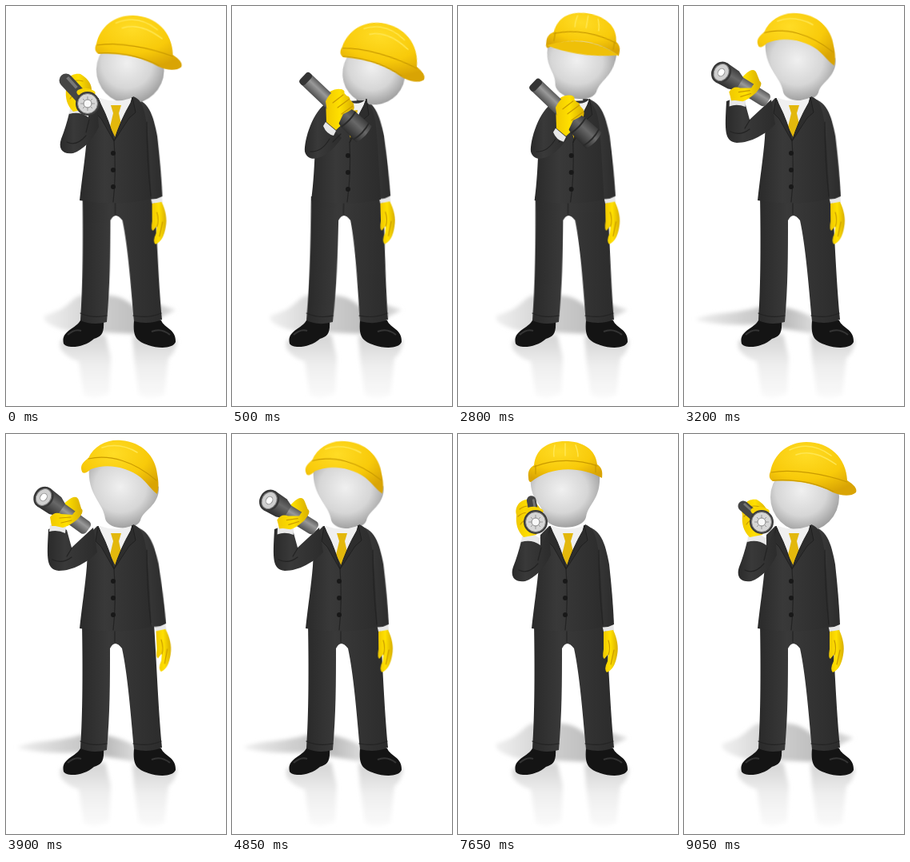
Recreate the animation shown at these times as an HTML page without scripts. Size 275x500 px, loop 9.65 s.

```html
<!DOCTYPE html>
<html lang="en">
<head>
<meta charset="utf-8">
<title>Inspector with a flashlight</title>
<style>
html, body { margin: 0; width: 100%; height: 100%; overflow: hidden; background: #fff }
svg { display: block; width: 275px; height: 500px }

/* Every move advances in 100 ms steps; three steps is the usual length. */
.move { animation: 9650ms steps(3, start) infinite }
.show { animation: 9650ms step-end infinite }

.show-hat-right { animation-name: show-hat-right }
.show-hat-front { animation-name: show-hat-front }
.show-left { animation-name: show-left }
.show-side { animation-name: show-side }
.show-fore { animation-name: show-fore }
.show-facing { animation-name: show-facing }
.show-wide { animation-name: show-wide }
.glare { animation-name: glare }

@keyframes show-hat-right { 0%, 91.7% { opacity: 1 } 27.97% { opacity: 0 } }
@keyframes show-hat-front { 0%, 31.08%, 91.7% { opacity: 0 } 27.97%, 57.51% { opacity: 1 } }
@keyframes show-left { 0%, 57.51% { opacity: 0 } 31.08% { opacity: 1 } }
@keyframes show-side { 0%, 31.08% { opacity: 0 } 2.07% { opacity: 1 } }
@keyframes show-facing { 0%, 31.08% { opacity: 1 } 2.07% { opacity: 0 } }
@keyframes show-fore { 0%, 57.51% { opacity: 1 } 2.07% { opacity: 0 } }
@keyframes show-wide { 0%, 57.51% { opacity: 1 } 31.08% { opacity: 0 } }
@keyframes glare { 0%, 78.2% { opacity: 0 } 55.44% { opacity: 1 } }

.hat-right { animation-name: hat-right; transform-origin: 160px 40px }
@keyframes hat-right {
  0% { translate: 0 0; rotate: 0deg; animation-timing-function: steps(6, start) }
  6.21%, 9.84% { translate: 30px 12px; rotate: 8deg }
  12.95%, 15.54% { translate: 30px 15px; rotate: 10deg }
  18.65%, 24.87% { translate: 30px 12px; rotate: 8deg; animation-timing-function: steps(9, start) }
  34.19% { translate: -36px -9px; rotate: -16deg }
  89.63% { translate: -24px 0; rotate: -10deg; animation-timing-function: steps(5, start) }
  94.81%, 100% { translate: 0 0; rotate: 0deg }
}
.face-right { animation-name: face-right; transform-origin: 150px 78px }
@keyframes face-right {
  0% { translate: 0 0; scale: 1; animation-timing-function: steps(6, start) }
  6.21%, 18.65%, 24.87% { translate: 1px -5px; scale: .91; animation-timing-function: steps(9, start) }
  34.19%, 100% { translate: 0 0; scale: 1 }
}
.hat-front { animation-name: hat-front; transform-origin: 134px 40px }
@keyframes hat-front {
  0%, 24.87% { translate: 44px 0; rotate: 18deg; animation-timing-function: steps(9, start) }
  34.19% { translate: 8px 0; rotate: 3deg }
  55.44% { translate: 8px 0; rotate: 3deg; animation-timing-function: steps(5, start) }
  60.62%, 69.94%, 80.31% { translate: 0 0; rotate: 0deg }
  73.05%, 77.2% { translate: 0 1px; rotate: 0deg }
  89.63% { translate: 0 0; rotate: 0deg; animation-timing-function: steps(5, start) }
  94.81%, 100% { translate: 24px 0; rotate: 9deg }
}
.hat-left { animation-name: hat-left; transform-origin: 145px 50px }
@keyframes hat-left {
  0%, 24.87% { translate: 36px 0; rotate: 4deg; animation-timing-function: steps(9, start) }
  34.19%, 38.34%, 51.29% { translate: -2px 1px; rotate: -2deg }
  41.45%, 48.18% { translate: 0 0; rotate: 0deg }
  55.44% { translate: -2px 1px; rotate: -2deg; animation-timing-function: steps(5, start) }
  60.62%, 100% { translate: -8px 2px; rotate: -10deg }
}
.legs { animation-name: legs; transform-origin: 144px 395px }
@keyframes legs {
  0% { transform: skewX(0); animation-timing-function: steps(6, start) }
  6.21%, 24.87% { transform: skewX(-1.4deg); animation-timing-function: steps(9, start) }
  34.19%, 100% { transform: skewX(0) }
}
.side-torso { animation-name: side-torso }
@keyframes side-torso {
  0%, 24.87% { translate: 0 0; animation-timing-function: steps(9, start) }
  34.19%, 100% { translate: -6px 0 }
}
.hanging-arm { animation-name: hanging-arm; transform-origin: 172px 125px }
@keyframes hanging-arm {
  0% { rotate: 0deg; animation-timing-function: steps(6, start) }
  6.21%, 24.87% { rotate: -1.6deg; animation-timing-function: steps(9, start) }
  34.19%, 38.34%, 51.29% { rotate: -.5deg }
  41.45%, 48.18% { rotate: -2.6deg }
  55.44% { rotate: -.5deg; animation-timing-function: steps(5, start) }
  60.62%, 100% { rotate: 0deg }
}
.side-light { animation-name: side-light }
@keyframes side-light {
  0% { translate: -30px -6px; animation-timing-function: steps(6, start) }
  6.21%, 9.84% { translate: 0 0 }
  12.95%, 15.54% { translate: -1px -2px }
  18.65%, 24.87% { translate: 0 0; animation-timing-function: steps(9, start) }
  34.19%, 100% { translate: 9px 14px }
}
.left-light { animation-name: left-light; transform-origin: 75px 100px }
@keyframes left-light {
  0%, 24.87% { translate: 110px 50px; rotate: 0deg; animation-timing-function: steps(9, start) }
  34.19%, 38.34%, 51.29% { translate: 1px 2px; rotate: -4deg }
  41.45%, 48.18% { translate: 0 0; rotate: 0deg }
  55.44% { translate: 1px 2px; rotate: -4deg; animation-timing-function: steps(5, start) }
  60.62%, 100% { translate: 26px 20px; rotate: 20deg }
}
.left-sleeve { animation-name: left-sleeve }
@keyframes left-sleeve {
  0%, 24.87% { translate: 60px 40px; animation-timing-function: steps(9, start) }
  34.19%, 55.44% { translate: 0 0; animation-timing-function: steps(5, start) }
  60.62%, 100% { translate: 20px 18px }
}
.lens { animation-name: lens }
@keyframes lens {
  0% { translate: 97px 110px; animation-timing-function: steps(6, start) }
  6.21% { translate: 127px 182px }
  55.44% { translate: 70px 88px; animation-timing-function: steps(5, start) }
  60.62%, 69.94% { translate: 90px 99px }
  73.05%, 77.2% { translate: 87px 103px }
  80.31%, 100% { translate: 97px 110px }
}
.barrel { animation-name: barrel }
@keyframes barrel {
  0% { rotate: 0deg; scale: 1; animation-timing-function: steps(6, start) }
  6.21% { rotate: 36deg; scale: 2.8 }
  55.44% { rotate: 0deg; scale: .7; animation-timing-function: steps(5, start) }
  60.62%, 69.94% { rotate: 38deg; scale: .3 }
  73.05%, 77.2% { rotate: 38deg; scale: .5 }
  80.31%, 89.63% { rotate: 38deg; scale: .9; animation-timing-function: steps(5, start) }
  94.81%, 100% { rotate: 0deg; scale: 1 }
}
.fore-hand { animation-name: fore-hand }
@keyframes fore-hand {
  0% { translate: 0 0; animation-timing-function: steps(6, start) }
  6.21% { translate: 12px 18px }
  55.44% { translate: -14px -6px; animation-timing-function: steps(5, start) }
  60.62%, 77.2% { translate: -2px 2px }
  80.31%, 100% { translate: 0 0 }
}

.crease { fill: none; stroke: #232323; stroke-width: 1.2; stroke-linecap: round }
.rim { fill: none; stroke: #c99a00; stroke-width: 1.2; stroke-linecap: round }
.shine { fill: none; stroke: #ffe650; stroke-width: 1.5; stroke-linecap: round }
</style>
</head>
<body>
<svg viewBox="0 0 275 500">
<defs>
  <radialGradient id="skin" cx=".45" cy=".4" r=".62">
    <stop offset="0" stop-color="#f0f0f0"/><stop offset=".6" stop-color="#d6d6d6"/><stop offset="1" stop-color="#9c9c9c"/>
  </radialGradient>
  <radialGradient id="helmet" cx=".42" cy=".25" r=".75">
    <stop offset="0" stop-color="#ffdc25"/><stop offset=".6" stop-color="#f8ca0a"/><stop offset="1" stop-color="#d9a404"/>
  </radialGradient>
  <linearGradient id="glove">
    <stop offset="0" stop-color="#f0c800"/><stop offset=".5" stop-color="#ffe000"/><stop offset="1" stop-color="#d8ae00"/>
  </linearGradient>
  <linearGradient id="suit">
    <stop offset="0" stop-color="#2a2a2a"/><stop offset=".35" stop-color="#393939"/><stop offset="1" stop-color="#2c2c2c"/>
  </linearGradient>
  <linearGradient id="metal" x2="0" y2="1">
    <stop offset="0" stop-color="#5c5c5c"/><stop offset=".4" stop-color="#999"/><stop offset="1" stop-color="#505050"/>
  </linearGradient>
  <linearGradient id="lamp-head" x2="0" y2="1">
    <stop offset="0" stop-color="#3a3a3a"/><stop offset=".4" stop-color="#686868"/><stop offset="1" stop-color="#2c2c2c"/>
  </linearGradient>
  <linearGradient id="mirror" x2="0" y2="1">
    <stop offset=".1" stop-color="#d8d8d8"/><stop offset=".5" stop-color="#efefef"/><stop offset="1" stop-color="#fafafa"/>
  </linearGradient>
  <linearGradient id="shade">
    <stop offset="0" stop-color="#f0f0f0"/><stop offset=".4" stop-color="#cfcfcf"/><stop offset=".75" stop-color="#bcbcbc"/><stop offset="1" stop-color="#dedede"/>
  </linearGradient>
  <filter id="soft" x="-20%" y="-40%" width="140%" height="180%"><feGaussianBlur stdDeviation="2.5"/></filter>
  <g id="buttons" fill="#181818"><circle r="3"/><circle cy="21" r="3"/><circle cy="42" r="3"/></g>
</defs>

<g fill="url(#mirror)" filter="url(#soft)">
  <path d="M68 418L124 410L131 440L129 484Q110 494 97 486L91 444Q76 440 68 428Z"/>
  <path d="M158 412L214 418Q212 434 203 440L198 486Q180 494 166 486L160 440Z"/>
</g>
<g filter="url(#soft)" fill="url(#shade)">
  <path class="show show-wide" d="M92 362C78 368 80 378 48 387Q44 398 78 406L165 410L196 388L212 380L188 372L164 380Q146 360 122 362Z"/>
  <path class="show show-left" d="M94 376C62 386 34 382 14 392Q40 400 92 398L165 410L162 390Q130 372 94 376Z"/>
</g>

<g fill="#141414">
  <path d="M93 393H122C123 410 119 413 110 416C98 427 76 429 72 422C68 406 87 404 93 393Z"/>
  <path d="M160 393H194C198 403 213 404 212 420C208 429 190 428 178 424C164 419 158 415 160 393Z"/>
</g>
<path d="M77 411Q86 403 94 406M182 407Q194 402 205 411" fill="none" stroke="#343434" stroke-width="2"/>
<g class="move legs">
  <path fill="url(#suit)" d="M95 238H185C188 280 190 340 195 392Q178 399 160 394C156 350 152 300 145 268Q136 256 130 268C130 310 130 350 126 395Q108 400 93 393C96 350 96 290 95 238Z"/>
  <path class="crease" d="M93 384Q108 391 126 387M159 387Q177 391 194 384M136 246V260"/>
</g>

<g class="move hanging-arm">
  <path fill="#e6e6e6" d="M180 238L194 236L195 246L182 247Z"/>
  <path fill="url(#glove)" d="M182 247L194 245C199 256 201 266 199 276Q196 294 186 298Q182 294 187 284L188 275L183 281Q180 280 182 269Z"/>
  <path class="rim" d="M188 258Q191 268 188 276M195 270L191 288"/>
  <path fill="url(#suit)" d="M156 115C178 116 184 136 189 163C192 190 194 215 195 238Q186 243 177 241L164 180Z"/>
</g>

<g class="show show-hat-right"><g class="move hat-right">
  <ellipse class="move face-right" cx="151" cy="79" rx="43" ry="43" fill="url(#skin)"/>
  <path fill="url(#helmet)" d="M108 47C112 25 130 10 153 10C182 10 203 30 204 58C212 63 217 68 215 73C208 79 196 77 186 73C165 62 140 57 111 59C106 56 106 51 108 47Z"/>
  <path class="rim" d="M109 48C135 43 176 50 204 60M111 58C140 56 165 61 187 72"/>
  <path class="shine" d="M132 20Q158 8 184 27M140 26Q162 18 190 38"/>
</g></g>
<g class="show show-hat-front"><g class="move hat-front">
  <path fill="url(#skin)" d="M91 50C88 84 106 86 108 104C113 121 156 121 160 104C163 86 179 82 177 50Q134 26 91 50Z"/>
  <path fill="url(#helmet)" d="M88 54C87 46 90 42 95 39C97 18 113 9 134 9C156 9 172 19 174 38C180 42 181 47 180 55C152 40 116 40 91 60Q88 60 88 54Z"/>
  <path class="show show-side" fill="#efc008" d="M89 57Q134 34 180 54Q134 66 89 57Z"/>
  <path class="rim" d="M95 41C120 31 150 31 174 40M97 39V50M172 38V48"/>
  <path class="shine" d="M121 14Q119 23 120 28M134 12V27M147 14Q150 22 150 28"/>
</g></g>
<g class="show show-left"><g class="move hat-left">
  <path fill="url(#skin)" d="M104 42C101 76 122 86 124 106C128 121 163 121 168 108C171 95 192 90 191 66L150 32Z"/>
  <path fill="url(#helmet)" d="M95 47C92 40 96 35 103 30C110 14 128 6 144 8C170 10 187 28 189 50C191 60 191 68 189 75C183 71 177 62 168 54C152 41 125 36 106 44C101 49 96 50 95 47Z"/>
  <path class="rim" d="M103 31C130 25 160 34 188 58"/>
  <path class="shine" d="M120 17Q142 10 164 23"/>
</g></g>

<g class="show show-facing">
  <path fill="url(#suit)" d="M114 115L119 120L154 120L159 113C174 118 175 140 178 170L182 241Q138 251 92 243C95 215 99 190 101 165L103 126Z"/>
  <path fill="#f0f0f0" d="M117 115Q137 122 157 115L157 132L137 160L118 132Z"/>
  <path fill="#e3b80c" d="M131 124H144L141 134L145 152L137 165L130 151L134 134Z"/>
  <path fill="#2d2d2d" stroke="#202020" d="M115 115L112 134L119 141L135 169Q130 145 118 122ZM158 114L162 133L154 140L135 169Q143 143 156 121Z"/>
  <path class="crease" d="M135 169Q138 210 134 245M176 145Q176 190 181 238"/>
  <use href="#buttons" x="134" y="184"/>
</g>
<g class="show show-side"><g class="move side-torso">
  <path fill="url(#suit)" d="M118 120L164 118C180 124 180 150 182 175L186 242Q142 251 99 243C102 220 103 200 104 172Z"/>
  <path fill="#f0f0f0" d="M142 118Q158 126 167 117L166 130L152 158L142 140Z"/>
  <path fill="#e3b80c" d="M148 131L157 130L154 150L149 168L144 153Z"/>
  <path fill="#2d2d2d" stroke="#202020" d="M168 116L171 136L164 142L147 171Q153 145 165 124Z"/>
  <path class="crease" d="M147 170Q149 210 144 245"/>
  <use href="#buttons" x="145" y="187"/>
</g></g>

<g class="show show-fore">
  <path fill="url(#suit)" d="M79 134Q92 128 104 137L105 142L113 117L116 151C108 168 96 180 84 184C70 186 65 178 69 166C73 156 76 146 79 134Z"/>
  <path class="crease" d="M104 142L100 158M76 170Q88 176 100 162"/>
  <path fill="#e8e8e8" d="M80 128Q92 122 103 131L103 139Q92 131 79 135Z"/>
  <g class="move fore-hand">
    <path fill="url(#glove)" d="M73 101C70 89 80 80 91 82Q106 91 105 104L98 126L82 129C74 121 72 112 73 101Z"/>
    <path class="rim" d="M77 94Q85 88 94 91M75 103Q82 97 88 99M78 113Q82 107 87 108"/>
  </g>
  <g class="move lens">
    <g class="move barrel">
      <path d="M-23 -20L0 0" stroke="#454545" stroke-width="13" stroke-linecap="round"/>
      <path d="M-22 -23L-12 -14" stroke="#777" stroke-width="3"/>
    </g>
    <path d="M-10 -14Q-2 -18 6 -13" fill="none" stroke="#f8d400" stroke-width="7" stroke-linecap="round"/>
    <circle r="15" fill="#3c3c3c"/>
    <circle r="12.5" fill="#d6d6d6" stroke="#777"/>
    <path d="M-9 0H9M0 -9V9M-6 -6L6 6M-6 6L6 -6" stroke="#999"/>
    <circle r="5" fill="#f8f8f8" stroke="#888"/>
    <circle class="show glare" r="12.5" fill="#fff" stroke="#aaa"/>
  </g>
</g>

<g class="show show-side">
  <path fill="url(#suit)" d="M120 120C101 130 90 168 91 182C95 198 119 192 137 165L122 149L126 140Z"/>
  <path class="crease" d="M98 182Q112 183 122 166M126 170L136 160"/>
  <g class="move side-light">
    <path fill="#e8e8e8" d="M117 145L130 156L127 162Q118 160 114 150Z"/>
    <path fill="url(#glove)" d="M117 114Q124 102 136 104L152 122Q155 131 145 141L130 155L118 145Z"/>
    <g transform="translate(91 90) rotate(43.5)">
      <rect y="-9" width="66" height="18" rx="3" fill="url(#metal)"/>
      <rect x="-3" y="-9" width="9" height="18" rx="4" fill="#343434"/>
      <path d="M62 -10L74 -13L102 -14Q107 0 102 14L74 13L62 10Z" fill="url(#lamp-head)"/>
      <path d="M75 -13Q78 0 75 13M97 -14Q101 0 97 14" fill="none" stroke="#2a2a2a" stroke-width="2"/>
    </g>
    <path fill="url(#glove)" d="M117 119Q124 104 137 104Q143 106 139 111L130 116Q145 109 147 115Q148 120 136 125Q149 118 152 124Q152 130 139 135L132 150L121 147Z"/>
    <path class="rim" d="M139 111L126 121M147 116L132 127M151 125L137 135"/>
  </g>
</g>

<g class="show show-left">
  <path class="move left-sleeve" fill="url(#suit)" d="M53 119Q65 113 76 120L82 142L109 117L114 148C102 160 84 171 66 171C50 169 51 156 53 119Z"/>
  <path class="crease" d="M82 143L76 153M58 157Q70 163 82 154"/>
  <g class="move left-light">
    <path fill="#e8e8e8" d="M55 114Q66 110 75 116L74 124Q64 119 54 122Z"/>
    <path fill="url(#glove)" d="M56 103Q64 94 76 84Q88 74 91 83L95 96Q93 108 76 115L57 115Z"/>
    <g transform="translate(47 79) rotate(36)">
      <rect x="20" y="-9" width="49" height="18" rx="5" fill="url(#metal)"/>
      <path d="M0 -14L18 -13L27 -9V9L18 13L0 14Z" fill="url(#lamp-head)"/>
      <ellipse rx="12" ry="14" fill="#383838"/>
      <ellipse rx="9" ry="11" fill="#d0d0d0" stroke="#888"/>
      <ellipse rx="4" ry="5" fill="#fff" stroke="#999"/>
    </g>
    <path fill="url(#glove)" d="M55 104Q61 96 69 100L83 101Q90 91 95 94Q98 98 89 107Q79 115 71 117L57 114Z"/>
    <path class="rim" d="M67 105L81 104M69 111L82 108"/>
  </g>
</g>
</svg>
</body>
</html>
```
